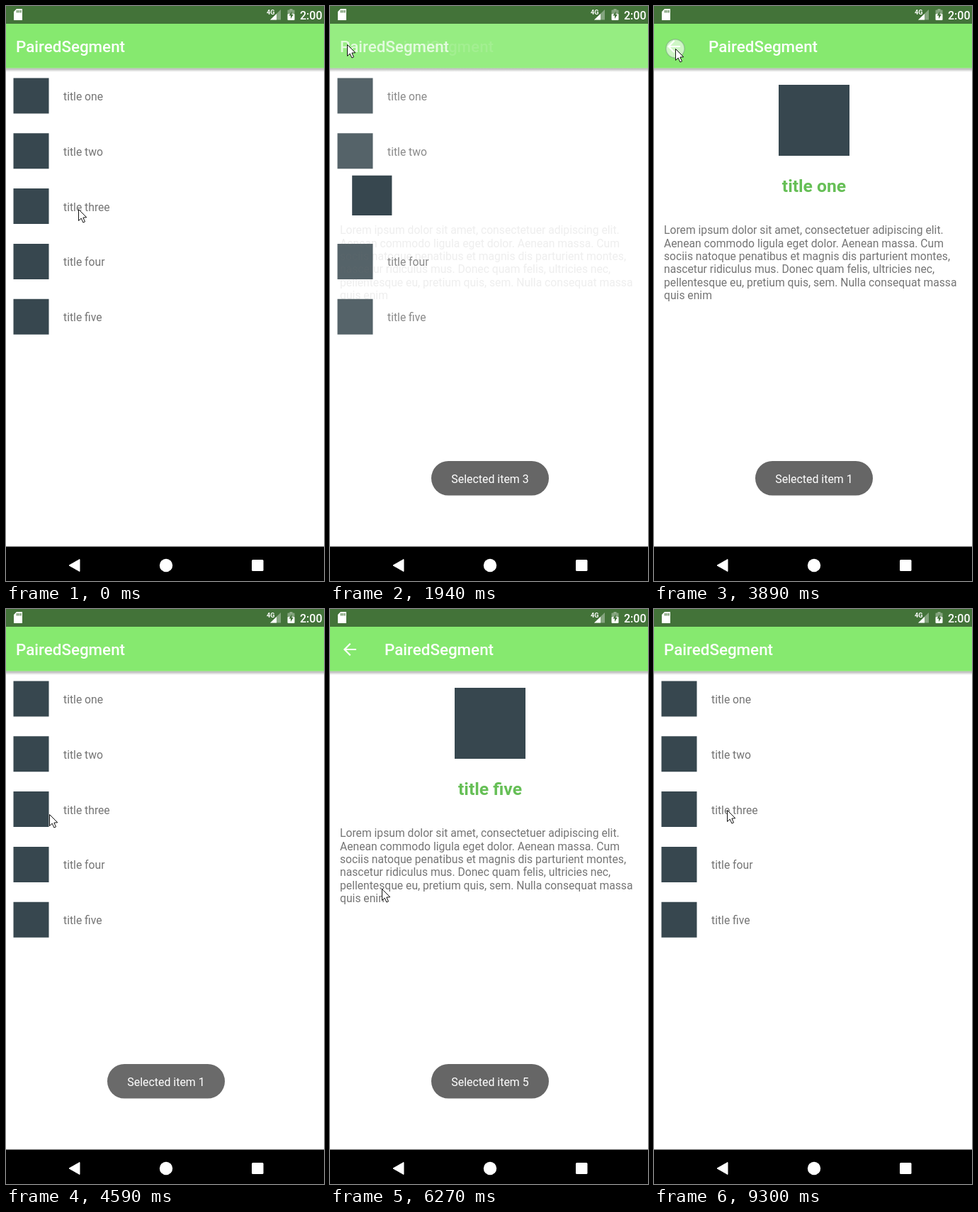
An HTML page with a canvas that plays this animation: 449 by 810 pixels, repeating every 9.45 s.

```html
<!DOCTYPE html>
<html lang="en">
<head>
<meta charset="utf-8">
<title>List to detail transition</title>
<style>
html, body { margin: 0; width: 100%; height: 100%; overflow: hidden; background: #fff }
canvas { display: block }
</style>
</head>
<body>
<canvas id="stage" width="449" height="810"></canvas>
<script>
const ctx = document.getElementById('stage').getContext('2d');
const LOOP = 9450;
const APP = 'PairedSegment';
const SLATE = '#37474f';
const ROW = 77.8;
const ROWS = ['one', 'two', 'three', 'four', 'five'].map(n => 'title ' + n);
const LOREM = [
  'Lorem ipsum dolor sit amet, consectetuer adipiscing elit.',
  'Aenean commodo ligula eget dolor. Aenean massa. Cum',
  'sociis natoque penatibus et magnis dis parturient montes,',
  'nascetur ridiculus mus. Donec quam felis, ultricies nec,',
  'pellentesque eu, pretium quis, sem. Nulla consequat massa',
  'quis enim'
];

// One visit per opened row; times in ms
const VISITS = [
  { row: 2, toast: 157, open: [330, 690], close: [1710, 2010] },
  { row: 0, toast: 2658, open: [2830, 3100], close: [4040, 4340] },
  { row: 4, toast: 5415, open: [5540, 5810], close: [7210, 7510] }
];
const CLICKS = [100, 1560, 2400, 3890, 5190, 7050];
// Pointer stops: time, x, y
const PATH = [
  [0, 102, 286], [780, 102, 286], [1330, 24, 54], [1950, 24, 54], [2440, 57, 116],
  [3270, 57, 116], [3720, 30, 60], [4300, 30, 60], [4810, 81, 435], [5040, 81, 441],
  [6120, 81, 441], [6780, 19, 58], [7500, 19, 58], [8130, 92, 271], [8230, 92, 271],
  [8530, 98, 280], [8690, 98, 280], [8760, 98, 281], [9090, 98, 281], [9300, 103, 283],
  [LOOP, 103, 283]
];

const clamp = v => Math.min(1, Math.max(0, v));
const mix = (a, b, p) => a + (b - a) * p;
const ease = p => (1 - Math.cos(Math.PI * p)) / 2;
const progress = (t, [from, to]) => clamp((t - from) / (to - from));

function text(str, x, y, size, color, weight = 400, align = 'left') {
  ctx.font = `${weight} ${size}px Roboto, sans-serif`;
  ctx.textAlign = align;
  ctx.fillStyle = color;
  ctx.fillText(str, x, y);
}

function rect(x, y, w, h, color, r = 0) {
  ctx.fillStyle = color;
  ctx.beginPath();
  ctx.roundRect(x, y, w, h, r);
  ctx.fill();
}

function circle(x, y, r, color) {
  ctx.fillStyle = color;
  ctx.beginPath();
  ctx.arc(x, y, r, 0, 7);
  ctx.fill();
}

function poly(points, color) {
  ctx.fillStyle = color;
  ctx.beginPath();
  for (let i = 0; i < points.length; i += 2) ctx.lineTo(points[i], points[i + 1]);
  ctx.closePath();
  ctx.fill();
}

function layer(alpha, draw) {
  if (alpha <= 0) return;
  ctx.save();
  ctx.globalAlpha = alpha;
  draw();
  ctx.restore();
}

const badge = (x, y, size) => rect(x - size / 2, y - size / 2, size, size, SLATE);

function appBar(titleX) {
  const shade = ctx.createLinearGradient(0, 87.5, 0, 93);
  shade.addColorStop(0, 'rgba(0,0,0,.32)');
  shade.addColorStop(1, 'rgba(0,0,0,0)');
  rect(0, 87.5, 449, 5.5, shade);
  rect(0, 25, 449, 62.5, '#86e96f');
  text(APP, titleX, 65.3, 22.4, '#fff', 500);
}

function list(hidden) {
  appBar(14);
  ROWS.forEach((title, i) => {
    if (i === hidden) return;
    badge(35.5, 126.5 + ROW * i, 50);
    text(title, 81, 133 + ROW * i, 15.7, '#757575');
  });
}

function detail() {
  appBar(77);
  ctx.strokeStyle = '#fff';
  ctx.lineWidth = 2.2;
  ctx.beginPath();
  ctx.moveTo(37, 57);
  ctx.lineTo(21, 57);
  ctx.moveTo(28.7, 48.8);
  ctx.lineTo(20.5, 57);
  ctx.lineTo(28.7, 65.2);
  ctx.stroke();
  LOREM.forEach((line, i) => text(line, 14, 321.3 + 18.35 * i, 15.7, '#757575'));
}

// Badge and title travelling between row (p = 0) and detail (p = 1)
function shared(row, p, closing) {
  badge(mix(35.5, 226, p), mix(126.5 + ROW * row, 161, p), mix(50, 100, p));
  const left = mix(81, 14, p), right = mix(137, 435, p);
  const title = closing ? 'title' : ROWS[row];
  ctx.save();
  ctx.beginPath();
  ctx.rect(left, 88, right - left, 670);
  ctx.clip();
  text(title, left + 212, mix(139 + ROW * row, 262, p), 24.7, '#66bf56', 700, 'center');
  ctx.restore();
}

function screens(t) {
  const v = VISITS.find(v => t >= v.open[0] && t < v.close[1]);
  if (!v) return list();
  const closing = t >= v.close[0];
  const p = closing ? 1 - ease(progress(t, v.close)) : ease(progress(t, v.open));
  layer((1 - p) ** 1.25, () => list(v.row));
  layer(p, detail);
  shared(v.row, p, closing);
}

function toast(t) {
  for (const v of VISITS) {
    const u = t - v.toast;
    if (u < 0 || u > 2350) continue;
    const alpha = u < 1850 ? 1 - (1 - clamp(u / 500)) ** 2 : 1 - ((u - 1850) / 500) ** 2;
    layer(alpha, () => rect(143, 641, 166, 48.5, '#666', 24.25));
    // White on a white page: the pill alone carries the fade
    text('Selected item ' + (v.row + 1), 226, 671.5, 15.9, '#fff', 400, 'center');
  }
}

function pointer(t) {
  const i = Math.max(1, PATH.findIndex(k => k[0] > t));
  const [t0, x0, y0] = PATH[i - 1], [t1, x1, y1] = PATH[i];
  const p = ease(progress(t, [t0, t1]));
  ctx.save();
  ctx.translate(Math.round(mix(x0, x1, p)), Math.round(mix(y0, y1, p)));
  for (const c of CLICKS) {
    const u = t - c;
    if (u < 0 || u > 380) continue;
    layer(clamp((380 - u) / 220), () => {
      circle(0, 0, 13, 'rgba(255,255,255,.6)');
      ctx.strokeStyle = 'rgba(110,140,130,.4)';
      ctx.lineWidth = 1.5;
      ctx.stroke();
    });
  }
  ctx.translate(0.5, 0.5);
  poly([0, 0, 0, 16, 3.7, 12.6, 6.4, 18.5, 9, 17.4, 6.4, 11.6, 11.3, 11.3], '#fff');
  ctx.strokeStyle = '#111';
  ctx.lineWidth = 1;
  ctx.stroke();
  ctx.restore();
}

function systemBars() {
  const green = '#437339', dim = 'rgba(255,255,255,.35)';
  rect(0, 0, 449, 25, green);
  poly([15, 4, 23, 4, 23, 20, 11, 20, 11, 8], '#fff');
  for (let x = 15; x < 22; x += 2.6) rect(x, 6, 1.3, 3.5, green);
  poly([388, 5, 388, 19.5, 373, 19.5], dim);
  poly([382, 11, 382, 19.5, 373, 19.5], '#fff');
  text('4G', 368, 11.5, 9, '#fff', 700);
  rect(400.5, 4, 4, 2, dim);
  rect(397.5, 5.5, 10, 5.5, dim, 1);
  rect(397.5, 11, 10, 9, '#fff', 1);
  poly([403.5, 7.5, 399.5, 13.5, 402, 13.5, 402, 18, 405.8, 12, 403.5, 12], green);
  text('2:00', 446.5, 18.5, 16, '#fff', 500, 'right');

  rect(0, 761.4, 449, 49, '#000');
  poly([89, 788, 104, 779.5, 104, 796.5], '#fff');
  ctx.strokeStyle = '#fff';
  ctx.lineWidth = 1;
  ctx.lineJoin = 'round';
  ctx.stroke();
  ctx.lineJoin = 'miter';
  circle(226, 788, 9.2, '#fff');
  rect(347, 780, 16.5, 16, '#fff', 1.5);
}

function frame() {
  const t = performance.now() % LOOP;
  rect(0, 0, 449, 810, '#fff');
  screens(t);
  systemBars();
  toast(t);
  pointer(t);
  requestAnimationFrame(frame);
}
frame();
</script>
</body>
</html>
```
